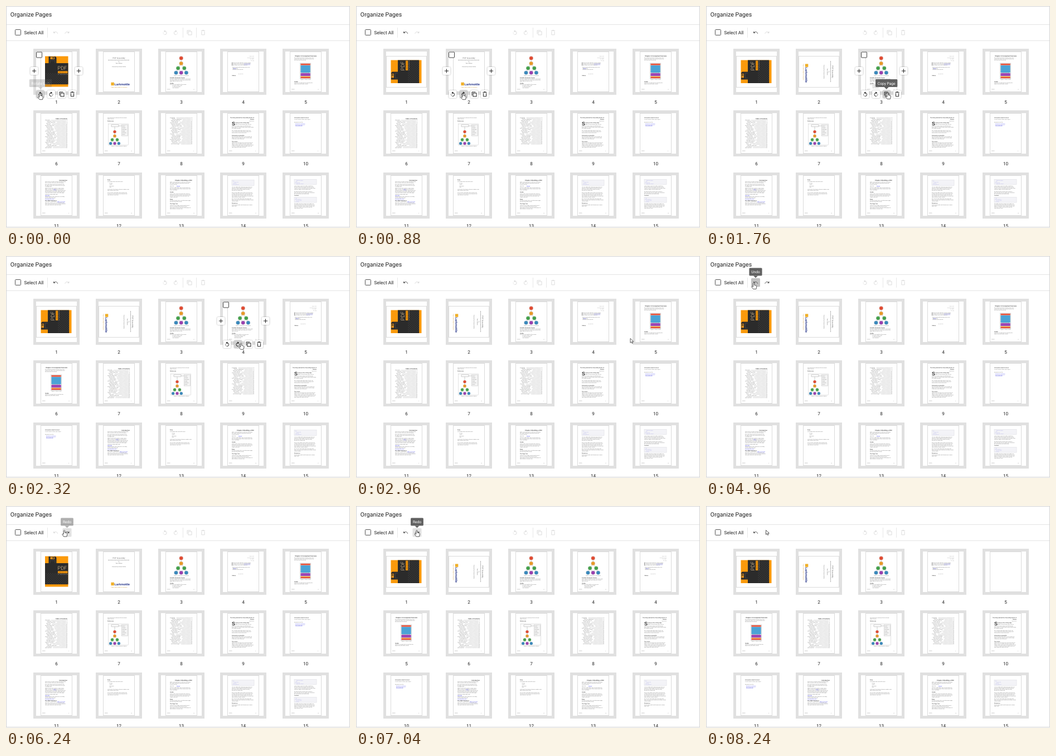
An HTML page that plays this animation: 617x400 px, repeating every 8400 ms.

```html
<!DOCTYPE html>
<html lang="en">
<head>
<meta charset="utf-8">
<title>Organize Pages</title>
<style>
html, body { margin: 0; width: 100%; height: 100%; overflow: hidden; background: #fff; }
svg { display: block; width: 617px; height: 400px; }
text { font-family: Roboto, sans-serif; fill: #212121; text-rendering: geometricPrecision; }
.doc text { font-family: "Liberation Sans", Arial, sans-serif; }
.doc .body { fill: #000; fill-opacity: .62; }
.doc .strong { font-weight: 700; fill-opacity: .8; }
.doc .link { fill: #2a2ae0; fill-opacity: .9; text-decoration: underline; }
.doc .faint { fill-opacity: .4; }
.icon { fill: none; stroke: currentColor; stroke-width: 1; }
.icon .solid { fill: currentColor; stroke: none; }
.button { filter: drop-shadow(0 .6px 1px rgba(0, 0, 0, .35)); }
</style>
</head>
<body>
<svg id="stage" viewBox="0 0 617 400"></svg>
<script>
const LOOP = 8400, STEP = 80, BOX = 83, MID = BOX / 2;
const stage = document.getElementById('stage');

function el(tag, attrs, parent, text) {
  const node = document.createElementNS('http://www.w3.org/2000/svg', tag);
  for (const key in attrs) node.setAttribute(key, attrs[key]);
  if (text !== undefined) node.textContent = text;
  parent.appendChild(node);
  return node;
}
const group = (parent, attrs = {}) => el('g', attrs, parent);
const rect = (g, x, y, width, height, fill, more = {}) =>
  el('rect', { x, y, width, height, fill, ...more }, g);
const path = (g, d, more = {}) => el('path', { d, ...more }, g);
const move = (node, x, y, rest = '') => node.setAttribute('transform', `translate(${x} ${y}) ${rest}`);
const show = (node, on) => node.setAttribute('visibility', on ? 'visible' : 'hidden');
const slotX = i => Math.round(49 + 111.75 * (i % 5));
const slotY = i => Math.round(77 + 111.4 * Math.floor(i / 5));

/* ---- document text ---- */
let seed = 7;
const random = () => (seed = (seed * 16807) % 2147483647) / 2147483647;
const words = ('the page of a file and object that content is in stream this text can reader format ' +
  'document with section each table fonts are used to open viewer structure line body reference').split(' ');

function phrase(chars) {
  let out = '';
  while (out.length < chars - 2) out += words[Math.floor(random() * words.length)] + ' ';
  return out.slice(0, chars).trim();
}
function write(g, x, y, text, size = 1.9, kind = '', more = {}) {
  return el('text', { x, y, 'font-size': size, class: 'body ' + kind, ...more }, g, text);
}
const CENTER = { 'text-anchor': 'middle' }, END = { 'text-anchor': 'end' };
const caption = (g, y, text, size = 1.8) => write(g, MID, y, text, size, '', CENTER);
const head = (g, y, text, size = 2.1) => write(g, 21, y, text, size, 'strong');
const rightHead = (g, y, text, size = 2.6) => write(g, 61, y, text, size, 'strong', END);
const link = (g, x, y, chars) => write(g, x, y, phrase(chars), 1.9, 'link');

function para(g, y, lines, chars = 44, x = 21) {
  for (let i = 0; i < lines; i++) {
    const last = i === lines - 1 && lines > 1;
    write(g, x, y + i * 2.1, phrase(last ? chars * (.3 + random() * .5) | 0 : chars));
  }
}
function contents(g, y, lines) {
  for (let i = 0; i < lines; i++) {
    const indent = i % 5 ? 2 + (i % 3) : 0, ly = y + i * 1.98;
    const title = phrase(10 + random() * 14 | 0);
    write(g, 21 + indent, ly, title, 1.8);
    path(g, `M${22 + indent + title.length * .9} ${ly - .2}H59`,
      { stroke: '#777', 'stroke-width': .5, 'stroke-dasharray': '.5 .4' });
    write(g, 61, ly, 6 + i, 1.8, '', END);
  }
}
function footer(g, n) {
  path(g, 'M16 73H21.5', { stroke: '#aaa', 'stroke-width': .6 });
  write(g, 63, 73.6, n, 1.9, 'faint');
}
function tree(g, x, y, k) {
  const nodes = [[0, 0, '#ea4f35'], [0, 9.5, '#f2a02c'], [-5.6, 18, '#47a84e'], [5.6, 18, '#47a84e'],
    [-9.2, 26.2, '#3b8ec4'], [0, 26.2, '#a244b6'], [9.2, 26.2, '#3b8ec4']];
  const t = group(g, { transform: `translate(${x} ${y}) scale(${k})` });
  path(t, 'M0 0V9.5L-5.6 18L-9.2 26.2M0 9.5L5.6 18L9.2 26.2M-5.6 18L0 26.2L5.6 18',
    { stroke: '#999', 'stroke-width': .5, fill: 'none' });
  for (const [cx, cy, fill] of nodes) {
    el('circle', { cx, cy, r: 3.3, fill, stroke: '#888', 'stroke-width': .3 }, t);
    write(t, cx, cy + .6, 'node', 1.7, 'faint', CENTER);
  }
}
function code(g, y, h) {
  rect(g, 21, y, 40, h, '#f3f3f7', { stroke: '#d8d8de', 'stroke-width': .5 });
  for (let ly = y + 2; ly < y + h; ly += 2)
    write(g, 22 + (ly % 3), ly, phrase(6 + random() * 12 | 0), 1.7, 'faint', { style: 'fill:#22c' });
}

const pageArt = [
  g => {
    rect(g, 21, 13.5, 41.5, 55, '#fb9a0c');
    rect(g, 21, 26, 41.5, 38.2, '#2b2b2b');
    for (let y = 45; y < 64; y += 2)
      path(g, `M${21 + y % 4} ${y}H62`, { stroke: '#3d3d3d', 'stroke-dasharray': '2 2' });
    path(g, 'M27.5 14H39.5L41.5 16V27H27.5Z', { fill: '#2b2b2b' });
    rect(g, 30.5, 14.5, 7.5, 4.5, '#d98a1c');
    rect(g, 34.8, 15.2, 1.8, 3, '#2b2b2b');
    path(g, 'M30 26V21.5H39V26', { stroke: '#555', 'stroke-width': .5, fill: 'none' });
    el('text', { x: 43.6, y: 38.4, 'font-size': 9, style: 'fill:#f5d3a0;font-family:Roboto,sans-serif;font-weight:300' }, g, 'PDF');
    rect(g, 44, 40.2, 17.5, 4, '#fb9a0c');
    write(g, 44.7, 43.1, 'GRACEFULLY', 2.5);
    write(g, 44, 47.2, 'BY TOBIN MARLOW', 1.9, '', { style: 'fill:#fff' });
  },
  g => {
    caption(g, 17.6, 'PDF Gracefully', 3.3);
    path(g, 'M22 20.5H60', { stroke: '#777', 'stroke-width': .6, 'stroke-dasharray': '2 .4' });
    caption(g, 24, 'By', 2);
    caption(g, 26.8, 'Tobin Marlow', 2.1);
    caption(g, 33, 'Foreword by Dorian Kettles', 2.1);
    rect(g, 27.4, 60.7, 5.5, 5.5, '#f0b02a');
    write(g, 33.5, 66, 'Larkmottle', 5.4, 'strong', { style: 'fill:#1f2f86;fill-opacity:1' });
    write(g, 27.5, 69.6, 'Paper made simple for everyone', 2, '', { style: 'fill:#c98a1a;fill-opacity:1' });
  },
  g => {
    tree(g, 41.2, 17, 1);
    caption(g, 49, 'Figure 2: Structure of a document');
    head(g, 52.8, 'Portable Document Format');
    para(g, 55.2, 3);
    head(g, 62.5, 'Header');
    para(g, 65, 1, 38);
    for (let i = 0; i < 3; i++) write(g, 25, 67.4 + i * 1.9, '• ' + phrase(24 - i * 5));
    footer(g, 12);
  },
  g => {
    for (const [y, n] of [[14, 10], [17, 14], [19.2, 10], [22, 8]])
      write(g, 61, y, phrase(n), 1.7, 'faint', END);
    para(g, 26, 3, 42, 22);
    link(g, 43, 28.3, 14);
    path(g, 'M21.5 24.5V30.5', { stroke: '#555', 'stroke-width': .6 });
    para(g, 33.5, 2, 40, 22);
    link(g, 24, 35.7, 8);
    para(g, 38, 1, 24, 22);
    write(g, 21.5, 48.5, 'Edition', 2, 'strong');
    write(g, 32, 46, phrase(14), 1.8, 'faint');
  },
  g => {
    rightHead(g, 14, 'Chapter 1  Conceptual Overview');
    para(g, 17, 3);
    rect(g, 31.3, 26, 19.5, 28, '#f2f2f2', { stroke: '#bbb', 'stroke-width': .5 });
    rect(g, 32.5, 26.8, 17.2, 2.8, '#e4513a');
    rect(g, 32.5, 30, 17.2, 13, '#4aa3d6');
    path(g, 'M34 43.4H48', { stroke: '#666', 'stroke-width': .5, 'stroke-dasharray': '1 .5' });
    rect(g, 32.5, 44, 17.2, 5.2, '#9c45b5');
    rect(g, 32.5, 49.6, 17.2, 1.3, '#f2a52b');
    rect(g, 32.5, 51, 17.2, 2.2, '#e4513a');
    caption(g, 56.3, 'Figure 1: Parts of a file');
    head(g, 59.8, 'Header');
    para(g, 62.2, 2);
    footer(g, 11);
  },
  g => { rightHead(g, 15.6, 'Table of Contents', 2.5); contents(g, 18, 26); footer(g, 3); },
  g => {
    para(g, 13.5, 2);
    head(g, 20.3, 'References');
    rect(g, 22.5, 24.5, 36, 38, 'none', { stroke: '#bbb', 'stroke-width': .4 });
    rect(g, 28, 26, 13, 3.5, '#fff', { stroke: '#999', 'stroke-width': .5 });
    path(g, 'M34 29.5V36M41 28H47', { stroke: '#999', 'stroke-width': .5 });
    rect(g, 46.5, 26, 11, 20, '#f4f4f4', { stroke: '#bbb', 'stroke-width': .5 });
    for (let y = 29; y < 46; y += 3) write(g, 47.5, y, phrase(9), 1.7);
    tree(g, 34, 38.6, .8);
    caption(g, 65.3, 'Figure 3: Pointers between objects');
    footer(g, 14);
  },
  g => { contents(g, 13.5, 25); footer(g, 4); },
  g => {
    rightHead(g, 14.3, 'The Story behind the Gracefully Series of', 2.2);
    rightHead(g, 17.2, 'Books', 2.2);
    write(g, 61, 20, phrase(16), 1.7, '', END);
    write(g, 21, 27, 'S', 9, 'strong');
    write(g, 27.5, 23, 'taying on the cutting edge', 2, 'strong');
    para(g, 26, 1, 36, 27.5);
    para(g, 29, 3);
    para(g, 37, 3);
    head(g, 45.5, 'Information is plentiful');
    para(g, 48, 3);
    head(g, 56.5, 'The series');
    para(g, 59, 5);
    footer(g, 6);
  },
  g => {
    head(g, 13.5, 'Information about the book', 2);
    para(g, 17, 1, 36);
    write(g, 21, 21.5, phrase(20));
    link(g, 23, 25, 18);
    link(g, 23, 27.5, 17);
    footer(g, 8);
  },
  g => {
    rightHead(g, 14.6, 'Introduction', 2.5);
    para(g, 17.3, 5);
    para(g, 29, 6);
    link(g, 36, 31.1, 9);
    link(g, 21, 41.7, 9);
    para(g, 44.2, 2);
    link(g, 21, 48.3, 22);
    head(g, 52.3, 'The PDF Standard', 2.4);
    para(g, 55, 3);
    link(g, 43, 53.2, 17);
    footer(g, 9);
  },
  g => {
    head(g, 14, 'Body', 2);
    para(g, 17, 1, 36);
    for (let i = 0; i < 4; i++) write(g, 24, 20.3 + i * 2.1, '• ' + phrase(6 + i % 3));
    para(g, 30.5, 2);
    para(g, 37, 3);
    footer(g, 13);
  },
  g => {
    rightHead(g, 15, 'Chapter 2  Building a PDF');
    para(g, 18, 3);
    write(g, 21, 24.6, phrase(11));
    link(g, 33, 24.6, 8);
    para(g, 28, 3);
    head(g, 36, 'Header');
    para(g, 38.5, 4);
    head(g, 48.5, 'Body');
    para(g, 51, 2);
    head(g, 57, 'The Page Tree');
    para(g, 59.5, 4);
    footer(g, 16);
  },
  g => {
    code(g, 13.5, 10);
    para(g, 27, 4);
    para(g, 36.5, 5);
    para(g, 48, 3);
    head(g, 56, 'Resources');
    para(g, 58.5, 2);
    footer(g, 17);
  },
  g => {
    code(g, 12.5, 9);
    para(g, 24.5, 4);
    para(g, 34.5, 3);
    head(g, 42, 'Content');
    code(g, 44.5, 9.5);
    para(g, 57, 5);
    footer(g, 18);
  }
];

/* ---- icons ---- */
const turn = g => {
  path(g, 'M0-2.6A3.1 3.1 0 0 1 0 3.6');
  path(g, 'M0 3.6A3.1 3.1 0 0 1-2.6-1', { 'stroke-dasharray': '1.2 .9' });
  path(g, 'M.6-4.8V-.5L-2.2-2.6Z', { class: 'solid' });
};
const back = g => {
  path(g, 'M-3.9-2.6V.9H-.4Z', { class: 'solid' });
  path(g, 'M-3-.2C-1.2-2.2 2.8-2 3.7 1.8');
};
const copy = g => { rect(g, -2, -2, 6, 6, 'none'); path(g, 'M-4 2.4V-4H2.4'); };
const trash = g => path(g, 'M-3.6-3.4H3.6M-1.4-4.3H1.4M-2.6-2V3.9H2.6V-2');
const plus = g => path(g, 'M-3.6 0H3.6M0-3.6V3.6');

function icon(parent, draw, x, y, color, flip = 1) {
  const g = group(parent, { class: 'icon', transform: `translate(${x} ${y}) scale(${flip} 1)`, style: `color:${color}` });
  draw(g);
  return g;
}

/* ---- fixed parts ---- */
rect(stage, 0, 0, 617, 400, '#fff');
el('text', { x: 7.8, y: 18.8, 'font-size': 10.7 }, stage, 'Organize Pages');
path(stage, 'M1 33.5H616M1 62.5H616', { stroke: '#e4e4e4' });
path(stage, 'M74.5 39V57M317.5 39V57M341.5 39V57', { stroke: '#e8e8e8' });
rect(stage, 16.5, 42.5, 10, 10, '#fff', { stroke: '#555', rx: 1 });
el('text', { x: 32.5, y: 50.8, 'font-size': 8.45 }, stage, 'Select All');
const OFF = '#dcdcdc', ON = '#555';
icon(stage, turn, 285, 48, OFF);
icon(stage, turn, 304.5, 48, OFF, -1);
icon(stage, copy, 329, 48, OFF);
icon(stage, trash, 353.5, 48, OFF);
const barButtons = [89, 109.5].map((x, i) => ({
  x,
  back: rect(stage, x - 8, 40, 16, 15.5, '#e4e4e4', { rx: 1.5 }),
  icon: icon(stage, back, x, 48, OFF, i ? -1 : 1)
}));

const labels = [];
for (let i = 0; i < 15; i++) {
  rect(stage, slotX(i) + 2.5, slotY(i) + 2.5, BOX - 5, BOX - 5, '#fff', { stroke: '#e0e0e0', 'stroke-width': 5 });
  labels.push(el('text', { x: slotX(i) + MID, y: slotY(i) + 99, 'font-size': 8.2, 'text-anchor': 'middle' }, stage));
}

const COPY = 15, BLANK = 16;
const pages = [...pageArt, pageArt[2], () => {}].map(draw => {
  const g = group(stage, { class: 'doc' });
  rect(g, 13.5, 5.5, 56, 72, '#fff', { stroke: '#dadada', 'stroke-width': 1 });
  draw(g);
  return g;
});

const tools = group(stage);
rect(tools, 5.5, 6, 10, 10, '#fff', { stroke: '#444', rx: 1 });
const toolButtons = [[1.5, 40, plus], [81.5, 40, plus], [12.5, 82, turn], [32, 82, turn, -1],
  [51, 82, copy], [70, 82, trash]].map(([x, y, draw, flip]) => {
  const back = rect(tools, x - 7, y - 7, 14, 14, '#fff', { rx: 2, class: 'button' });
  icon(tools, draw, x, y, '#222', flip);
  return { x, y, back };
});

rect(stage, 0, 399, 617, 1, '#fff');
rect(stage, .5, .5, 616, 398, 'none', { stroke: '#d6d6d6', 'stroke-width': 1.2 });

/* ---- tooltips: text, middle, bottom, from, to ---- */
const tips = [
  ['Rotate Left', 62, 146, -40, 520], ['Rotate Right', 193, 146, 880, 1280],
  ['Copy Page', 323.7, 146, 1560, 1920], ['Delete Page', 454, 146, 2560, 2800],
  ['Insert Left', 497.5, 104, 3120, 3520], ['Undo', 89, 35.5, 4480, 5960], ['Redo', 109.5, 35.5, 6160, 8080]
].map(([text, x, y, from, to]) => {
  const g = group(stage, { transform: `translate(${x} ${y})` });
  const label = el('text', { y: -4.4, 'font-size': 6.7, 'text-anchor': 'middle', style: 'fill:#fff' }, g, text);
  const w = label.getComputedTextLength() + 7.5;
  g.insertBefore(rect(g, -w / 2, -14, w, 14, '#616161', { rx: 1.5 }), label);
  path(g, 'M-4 0H4L0 4Z', { fill: '#616161' });
  return { g, from, to };
});

const ink = { fill: '#fff', stroke: '#333', 'stroke-width': .8, 'stroke-linejoin': 'round' };
const hand = path(stage, 'M-1.1 1Q0-.8 1.1 1V4.4L4.4 5.3Q5.5 5.7 5.3 7.2L4.5 11.6H-.8L-3.8 7.6Q-3.3 5.8-1.1 7.4Z', ink);
const arrow = path(stage, 'M0 0V8L1.9 6.2L3.2 9L4.5 8.4L3.3 5.7H5.8Z', ink);

/* ---- timeline ---- */
// Each click sets how many of the five edits are applied.
const clicks = [[480, 1], [1200, 2], [1920, 3], [2800, 4], [3520, 5],
  [4880, 4], [5120, 3], [5360, 2], [5600, 1], [5920, 0],
  [6400, 1], [6720, 2], [6960, 3], [7440, 4], [8000, 5]];
const FIRST_UNDO = 4880;

const route = [[0, 61, 157], [480, 61, 157], [880, 192, 157], [1200, 192, 157], [1520, 326, 156],
  [2000, 326, 156], [2480, 455, 157], [2800, 455, 157], [2960, 492, 148.5], [3120, 498, 114],
  [3920, 498, 114], [4480, 85.5, 48], [5920, 85.5, 48], [6080, 104.5, 43.5], [6240, 104.5, 43.5],
  [6400, 109, 43.5], [7760, 109, 43.5], [8000, 107.5, 43.5], [LOOP, 107.5, 43.5]];

function cursorAt(t) {
  const i = route.findIndex(p => p[0] > t);
  const [t0, x0, y0] = route[i - 1], [t1, x1, y1] = route[i];
  const k = (t - t0) / (t1 - t0), e = k * k * (3 - 2 * k);
  return [x0 + (x1 - x0) * e, y0 + (y1 - y0) * e];
}
function pageOrder(done) {
  const order = [...pageArt.keys()];
  if (done === 3) order.splice(3, 0, COPY);
  if (done === 5) order.splice(4, 0, BLANK);
  return order;
}
const near = (x, y, b) => Math.abs(x - b.x) < 8 && Math.abs(y - b.y) < 8;

function render(t) {
  const past = clicks.filter(c => c[0] <= t);
  const [clickTime, done] = past.length ? past[past.length - 1] : [-LOOP, 0];
  const [x, y] = cursorAt(t);

  const order = pageOrder(done);
  pages.forEach((g, id) => {
    const slot = order.indexOf(id), visible = slot >= 0 && slot < 15;
    show(g, visible);
    if (!visible) return;
    const angle = id === 0 && done > 0 ? -90 : id === 1 && done > 1 ? 90 : 0;
    move(g, slotX(slot), slotY(slot), `rotate(${angle} ${MID} ${MID})`);
  });
  // Numbers after a fresh copy lag behind by one.
  const stale = done === 3 && (t < 2080 || t >= 6960);
  labels.forEach((label, i) => label.textContent = stale && i > 3 ? i : i + 1);

  const slot = labels.findIndex((_, i) => {
    const dx = x - slotX(i), dy = y - slotY(i);
    return dx > -3 && dx < BOX + 3 && dy > 0 && dy < 90;
  });
  let pointing = false;
  show(tools, slot >= 0);
  if (slot >= 0) {
    move(tools, slotX(slot), slotY(slot));
    for (const b of toolButtons) {
      const over = near(x - slotX(slot), y - slotY(slot), b);
      b.back.setAttribute('fill', over ? '#d0d0d0' : '#fff');
      pointing = pointing || over;
    }
  }

  const enabled = [done > 0, t >= FIRST_UNDO && done < 5];
  barButtons.forEach((b, i) => {
    const over = enabled[i] && near(x, y, { x: b.x, y: 48 });
    show(b.back, over);
    b.back.setAttribute('fill', i === 0 && t - clickTime < 160 ? '#c2c2c2' : '#e2e2e2');
    b.icon.style.color = enabled[i] ? ON : OFF;
    pointing = pointing || over;
  });

  for (const tip of tips) {
    const fade = Math.min((t - tip.from) / 160, (tip.to - t) / 160, 1);
    tip.g.setAttribute('opacity', Math.max(0, fade));
  }
  show(hand, pointing);
  show(arrow, !pointing);
  move(pointing ? hand : arrow, x, y);
}

const start = performance.now();
let shown = -1;
function tick() {
  const t = Math.floor(Math.max(0, performance.now() - start) % LOOP / STEP) * STEP;
  if (t !== shown) render(shown = t);
  requestAnimationFrame(tick);
}
tick();
</script>
</body>
</html>
```
